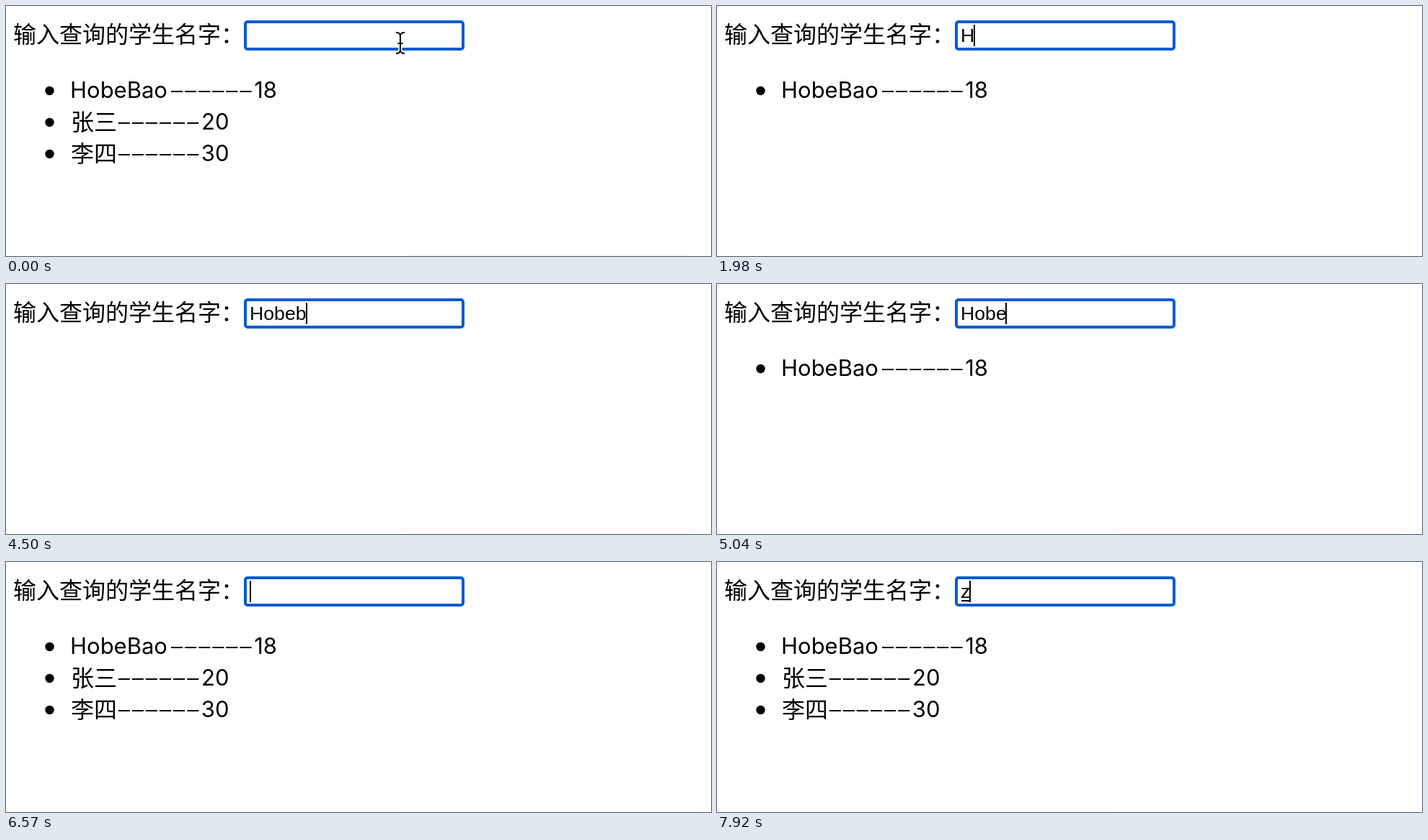
Animation of 978x348 px, one loop 8 s. Source, as an HTML page:

```html
<!DOCTYPE html>
<html lang="zh-CN">
<head>
<meta charset="utf-8">
<title>学生查询</title>
<style>
  html, body { margin: 0; width: 100%; height: 100%; overflow: hidden; background: #fff; }
  svg { display: block; width: 978px; height: 348px; }
  text { white-space: pre; }
  .cjk { font: 32px "Noto Sans CJK SC", "Noto Sans CJK", sans-serif; }
  .latin { font: 31px Inter, sans-serif; }
  .dash { font: 29px "Liberation Sans", Arial, sans-serif; text-anchor: middle; }
  .age { text-anchor: end; }
  #typed { font: 26.667px "Liberation Sans", Arial, sans-serif; }
</style>
</head>
<body>
<svg viewBox="0 0 978 348">
  <defs>
    <clipPath id="reveal"><rect id="wipe" x="334" y="24" width="298" height="34"/></clipPath>
  </defs>
  <path d="M556 347.5H950" stroke="#f1f1f1"/>
  <text class="cjk" x="10" y="51">输入查询的学生名字：</text>
  <rect x="332" y="22" width="302" height="38" rx="3" fill="#fff" stroke="#055bcd" stroke-width="4"/>
  <g clip-path="url(#reveal)">
    <text id="typed" x="338" y="50"></text>
    <rect id="underline" x="339" y="53" width="11" height="2"/>
    <rect id="caret" y="26" width="2" height="30"/>
  </g>
  <g id="rows"></g>
  <g id="pointer" fill="none" stroke-linecap="square">
    <path id="beam" stroke="#fff" stroke-width="5"
      d="M542 37Q546 37 547 41V62Q546 66 542 66M552 37Q548 37 547 41M547 62Q548 66 552 66M544.5 52H549.5"/>
    <use href="#beam" style="display:none"/>
    <path stroke="#000" stroke-width="2"
      d="M542 37Q546 37 547 41V62Q546 66 542 66M552 37Q548 37 547 41M547 62Q548 66 552 66M544.5 52H549.5"/>
  </g>
</svg>
<script>
const LOOP = 8000, TICK = 90, TEXT_X = 338;
const WIPE_START = 1260, WIPE_END = 1980, POINTER_HIDE = 1260, COMPOSE = 7830;
const $ = id => document.getElementById(id);

const students = [
  { name: 'HobeBao', age: 18, font: 'latin', x: 89, dashX: 237, ageX: 376 },
  { name: '张三', age: 20, font: 'cjk', x: 90, dashX: 163.7, ageX: 309.5 },
  { name: '李四', age: 30, font: 'cjk', x: 90, dashX: 163.7, ageX: 309.5 }
];

// time, field text, caret visible
const steps = [
  [0, '', 0], [540, '', 1], [990, '', 0],
  [1260, 'H', 1], [2520, 'H', 0], [2970, 'H', 1],
  [3060, 'Ho', 1], [3150, 'Hob', 1], [3330, 'Hobe', 1],
  [3780, 'Hobe', 0], [4320, 'Hobe', 1],
  [4500, 'Hobeb', 1], [4590, 'Hobeb', 0],
  [5040, 'Hobe', 1], [5130, 'Hobe', 0],
  [5580, 'Hob', 1], [5760, 'Ho', 1], [5850, 'H', 1],
  [6030, '', 1], [6120, '', 0], [6570, '', 1],
  [6660, 'z', 1], [6750, 'zh', 1], [6840, 'zhan', 1],
  [7020, 'zha', 1], [7110, 'zh', 1], [7200, 'z', 1],
  [7380, '', 1], [7470, '', 0],
  [7830, 'z', 0], [7920, 'z', 1]
];

function add(parent, tag, attrs, text = '') {
  const el = document.createElementNS('http://www.w3.org/2000/svg', tag);
  for (const key in attrs) el.setAttribute(key, attrs[key]);
  el.textContent = text;
  return parent.appendChild(el);
}

students.forEach((s, i) => {
  const g = s.el = add($('rows'), 'g', {});
  const base = 128 + 44 * i;
  const dashes = Array.from({ length: 6 }, (_, k) => s.dashX + 19.1 * k).join(' ');
  add(g, 'circle', { cx: 60.5, cy: base - 10, r: 6.2 });
  add(g, 'text', { class: s.font, x: s.x, y: s.font === 'cjk' ? base + 1 : base }, s.name);
  add(g, 'text', { class: 'dash', x: dashes, y: base - 1.5 }, '–'.repeat(6));
  add(g, 'text', { class: 'latin age', x: s.ageX, y: base }, s.age);
});

const show = (el, on) => el.setAttribute('visibility', on ? 'visible' : 'hidden');

function draw(t) {
  const [, text, caret] = steps.findLast(s => s[0] <= t);
  const wiping = t >= WIPE_START && t < WIPE_END;
  const composing = t >= COMPOSE;
  const query = wiping || composing ? '' : text;

  $('typed').textContent = text;
  const end = text ? $('typed').getComputedTextLength() : 0;
  $('caret').setAttribute('x', 2 * Math.floor((TEXT_X + end) / 2));
  show($('caret'), caret);
  show($('underline'), composing);
  show($('pointer'), t < POINTER_HIDE);

  // the first letter uncovers from the top in small steps
  const tick = Math.floor((t - WIPE_START) / TICK);
  $('wipe').setAttribute('height', wiping ? 6 + 3.75 * tick : 34);
  students.forEach(s => show(s.el, s.name.includes(query)));
}

const start = performance.now();
function frame() {
  draw((performance.now() - start) % LOOP);
  requestAnimationFrame(frame);
}
frame();
</script>
</body>
</html>
```
